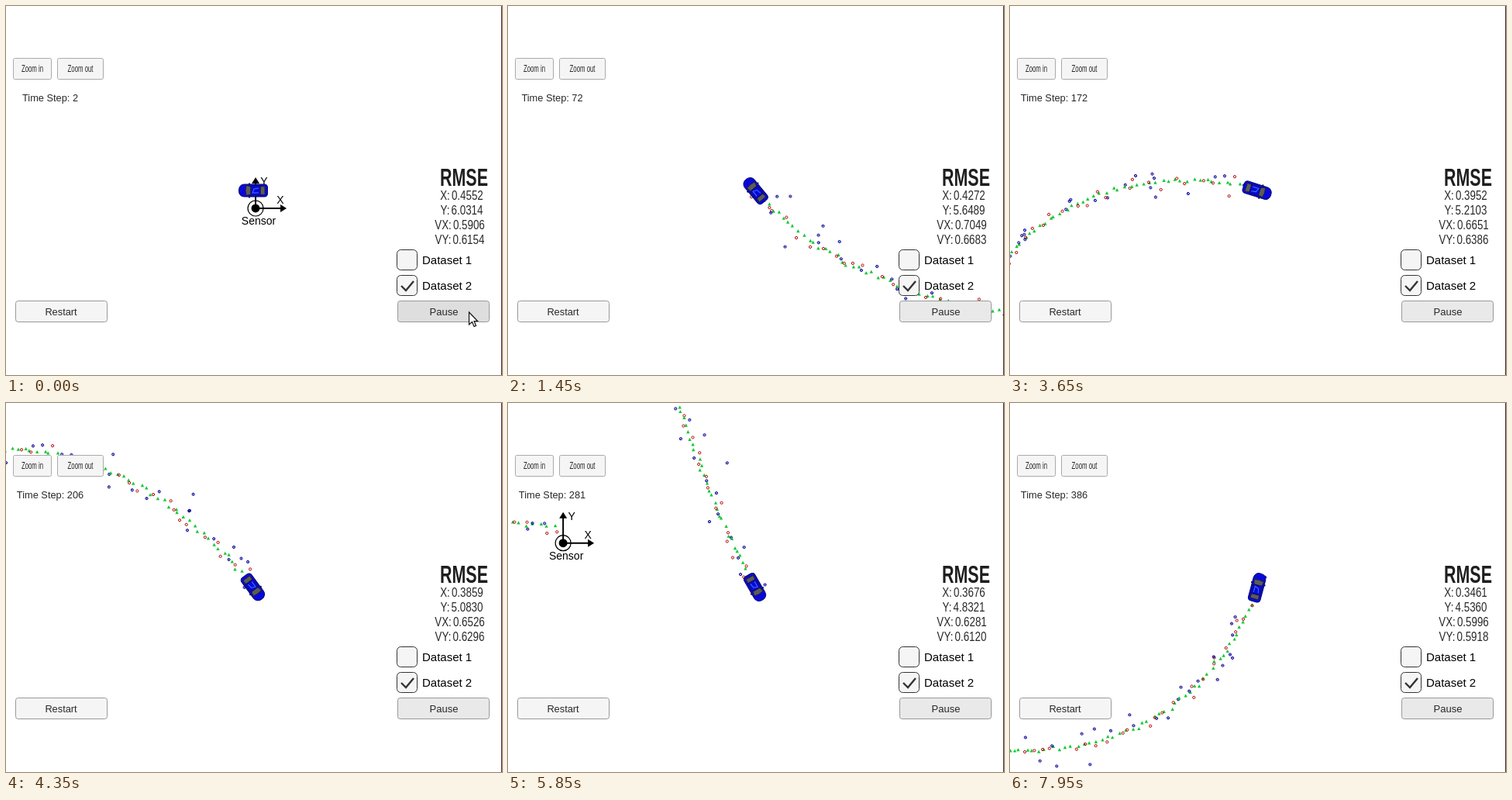
An HTML page with a canvas for the animation above (8 s loop, 640 by 476 pixels).

```html
<!DOCTYPE html>
<html lang="en">
<head>
<meta charset="utf-8">
<title>Sensor tracking</title>
<style>
  html, body { margin: 0; width: 100%; height: 100%; overflow: hidden; background: #fff; }
  canvas { display: block; width: 640px; height: 476px; }
</style>
</head>
<body>
<canvas id="stage" width="640" height="476"></canvas>
<script>
const ctx = document.getElementById('stage').getContext('2d');
const FONT = '"Liberation Sans", Arial, sans-serif';
const LOOP = 8000, TICK = 50, SCALE = 33.8, DT = 0.05, STEPS = 400;
const CAR = { x: 319, y: 238 };
const INK = '#282828';

// [time in ms, step]; the run pauses briefly at step 135
const PACE = [[0, 2], [2750, 135], [2850, 135], [3650, 172], [5000, 238], [6750, 327], [7950, 386]];

let seed = 20170;
function random() {
  seed = (seed * 16807) % 2147483647;
  return seed / 2147483647;
}
const gauss = sd => sd * Math.sqrt(-2 * Math.log(random())) * Math.cos(2 * Math.PI * random());

// Figure eight: sinusoidal yaw rate and a gently varying speed, in metres.
function buildPath() {
  const path = [], omega = 2 * Math.PI / 25;
  let x = -0.09, y = 0.68;
  for (let i = 0; i <= STEPS; i++) {
    const phase = omega * i * DT;
    const yaw = Math.PI - 0.55 / omega * (1 - Math.cos(phase));
    const speed = 5 + 0.2 * Math.cos(2 * phase);
    if (i > 2) {
      x += speed * DT * Math.cos(yaw);
      y += speed * DT * Math.sin(yaw);
    }
    path.push({ x, y, yaw });
  }
  return path;
}

const jitter = (p, sd) => ({ x: p.x + gauss(sd), y: p.y + gauss(sd) });

function measure(p, i) {
  const estimate = jitter(p, 0.05);
  if (i % 2) return { estimate, lidar: jitter(p, 0.14) };
  const range = Math.hypot(p.x, p.y) + gauss(0.25);
  const angle = Math.atan2(p.y, p.x) + gauss(0.022);
  return { estimate, radar: { x: range * Math.cos(angle), y: range * Math.sin(angle), angle } };
}

const path = buildPath();
const marks = path.map(measure);

function stepAt(time) {
  const k = PACE.findIndex(([t], i) => i > 0 && time <= t);
  const [[t0, s0], [t1, s1]] = PACE.slice(k - 1, k + 1);
  return Math.round(s0 + (s1 - s0) * (time - t0) / (t1 - t0));
}

// Root mean square over a previous run of 500 steps plus the current one.
function rmse(step, first, surge, slope) {
  const n = step - 2;
  const sum = 500 * first ** 2 + surge * (1 - Math.exp(-n / 20)) + slope * n;
  return Math.sqrt(sum / (500 + n)).toFixed(4);
}

function text(str, x, y, size, { color = '#000', squeeze = 1, align = 'center', weight = '', gap = 0 } = {}) {
  ctx.save();
  ctx.translate(x, y);
  ctx.scale(squeeze, 1);
  ctx.font = `${weight} ${size}px ${FONT}`;
  ctx.wordSpacing = gap + 'px';
  ctx.textAlign = align;
  ctx.fillStyle = color;
  ctx.fillText(str, 0, 0);
  ctx.restore();
}

function box(x, y, w, h, r, fill, stroke) {
  ctx.beginPath();
  ctx.roundRect(x + 0.5, y + 0.5, w - 1, h - 1, r);
  ctx.fillStyle = fill;
  ctx.fill();
  ctx.strokeStyle = stroke;
  ctx.lineWidth = 1;
  ctx.stroke();
}

function poly(points, fill, stroke, width = 1) {
  ctx.beginPath();
  points.forEach(([x, y]) => ctx.lineTo(x, y));
  if (fill) {
    ctx.closePath();
    ctx.fillStyle = fill;
    ctx.fill();
  }
  if (stroke) {
    ctx.strokeStyle = stroke;
    ctx.lineWidth = width;
    ctx.stroke();
  }
}

function ring(x, y, r, color, width = 1) {
  ctx.beginPath();
  ctx.arc(x, y, r, 0, 7);
  ctx.strokeStyle = color;
  ctx.lineWidth = width;
  ctx.stroke();
}

function drawSensor(x, y) {
  ctx.save();
  ctx.translate(x, y);
  for (const turn of [0, -Math.PI / 2]) {
    ctx.save();
    ctx.rotate(turn);
    poly([[0, 0], [33, 0]], null, '#000', 2);
    poly([[40, 0], [32, -5], [32, 5]], '#000');
    ctx.restore();
  }
  ring(0, 0, 10, '#000', 1.2);
  ring(0, 0, 2.75, '#000', 5.5);
  text('Y', 11, -30, 14);
  text('X', 32, -6, 14);
  text('Sensor', 4, 21, 14);
  ctx.restore();
}

function drawMarks(step, toScreen) {
  for (let i = 3; i <= step; i++) {
    const { estimate, lidar, radar } = marks[i];
    const [x, y] = toScreen(estimate);
    poly([[x, y - 2.2], [x + 2.2, y + 2], [x - 2.2, y + 2]], '#14c832');
    const [mx, my] = toScreen(lidar || radar);
    ring(mx, my, 1.6, lidar ? '#b40000' : '#000096');
    if (radar) {
      const dx = 1.6 * Math.cos(radar.angle), dy = -1.6 * Math.sin(radar.angle);
      poly([[mx - dx, my - dy], [mx + dx, my + dy]], null, '#000096', 0.7);
    }
  }
}

function drawCar(yaw) {
  ctx.save();
  ctx.translate(CAR.x, CAR.y);
  ctx.rotate(-yaw);
  ctx.fillStyle = '#101050';
  ctx.fillRect(4, -9.5, 2, 19);
  ctx.beginPath();
  ctx.roundRect(-18.5, -8, 37, 16, [4, 7, 7, 4]);
  ctx.fillStyle = '#0808dc';
  ctx.fill();
  ctx.strokeStyle = '#080870';
  ctx.lineWidth = 1;
  ctx.stroke();
  poly([[3, -5], [9, -6.5], [10, 0], [9, 6.5], [3, 5]], '#5c5c5c', '#202040');
  poly([[-9, -5], [-15, -5.5], [-15, 5.5], [-9, 5]], '#5c5c5c', '#202040');
  ctx.strokeStyle = '#101060';
  ctx.strokeRect(-9, -6, 12, 12);
  poly([[-7, -3], [1, -3], [-1, 2], [-7, 3]], null, '#3c78f0');
  ctx.restore();
}

function drawPanel(step, pressed) {
  const narrow = { color: INK, squeeze: 0.65 };
  box(9, 67, 50, 28, 2, '#f5f5f5', '#aaa');
  text('Zoom in', 34, 85, 12, narrow);
  box(66, 67, 60, 28, 2, '#f5f5f5', '#aaa');
  text('Zoom out', 96, 85, 12, narrow);
  text('Time Step: ' + step, 57, 123, 12.8, { color: INK });
  box(12, 380, 119, 28, 3, '#f5f5f5', '#999');
  text('Restart', 71, 399, 12.8, { color: INK });

  text('RMSE', 591, 232, 31, { color: '#1e1e1e', squeeze: 0.69, weight: 'bold' });
  const errors = {
    X: rmse(step, 0.4552, 0, 0.006),
    Y: rmse(step, 6.0314, 0, 0),
    VX: rmse(step, 0.5906, 105, 0.1),
    VY: rmse(step, 0.6154, 55, 0.17)
  };
  Object.entries(errors).forEach(([name, value], i) =>
    text(`${name}: ${value}`, name.length > 1 ? 585.5 : 588, 249.5 + 19 * i, 16.5,
      { color: INK, squeeze: 0.81, gap: -2 }));

  for (const [i, y] of [315, 348].entries()) {
    box(504, y - 1, 27, 27, 5, '#f5f5f5', '#333');
    text('Dataset ' + (i + 1), 537, y + 18, 15, { align: 'left' });
  }
  poly([[510, 361], [516, 367], [526, 355]], null, '#333', 2.4);
  box(505, 380, 119, 28, 3, pressed ? '#dedede' : '#e9e9e9', '#999');
  text('Pause', 565, 399, 13, { color: INK });
}

function drawPointer(x, y) {
  ctx.save();
  ctx.translate(x + 0.5, y);
  poly([[0, 0], [0, 16], [4, 12.5], [6.5, 18.5], [9, 17.5], [6.5, 11.5], [11, 11.5], [0, 0]],
    '#fff', '#111', 1.2);
  ctx.restore();
}

function draw(time) {
  const step = stepAt(time);
  const car = path[step];
  const toScreen = p => [CAR.x + (p.x - car.x) * SCALE, CAR.y - (p.y - car.y) * SCALE];
  const starting = time < TICK;
  ctx.fillStyle = '#fff';
  ctx.fillRect(0, 0, 640, 476);
  drawSensor(...toScreen({ x: 0, y: 0 }));
  drawMarks(step, toScreen);
  drawCar(path[step + 2].yaw);
  drawPanel(step, starting);
  if (starting) drawPointer(597, 395);
  ctx.fillStyle = '#46282c';
  ctx.fillRect(639, 0, 1, 476);
}

const start = performance.now();
function frame() {
  const elapsed = (performance.now() - start) % LOOP;
  draw(Math.floor(elapsed / TICK) * TICK);
  requestAnimationFrame(frame);
}
frame();
</script>
</body>
</html>
```
